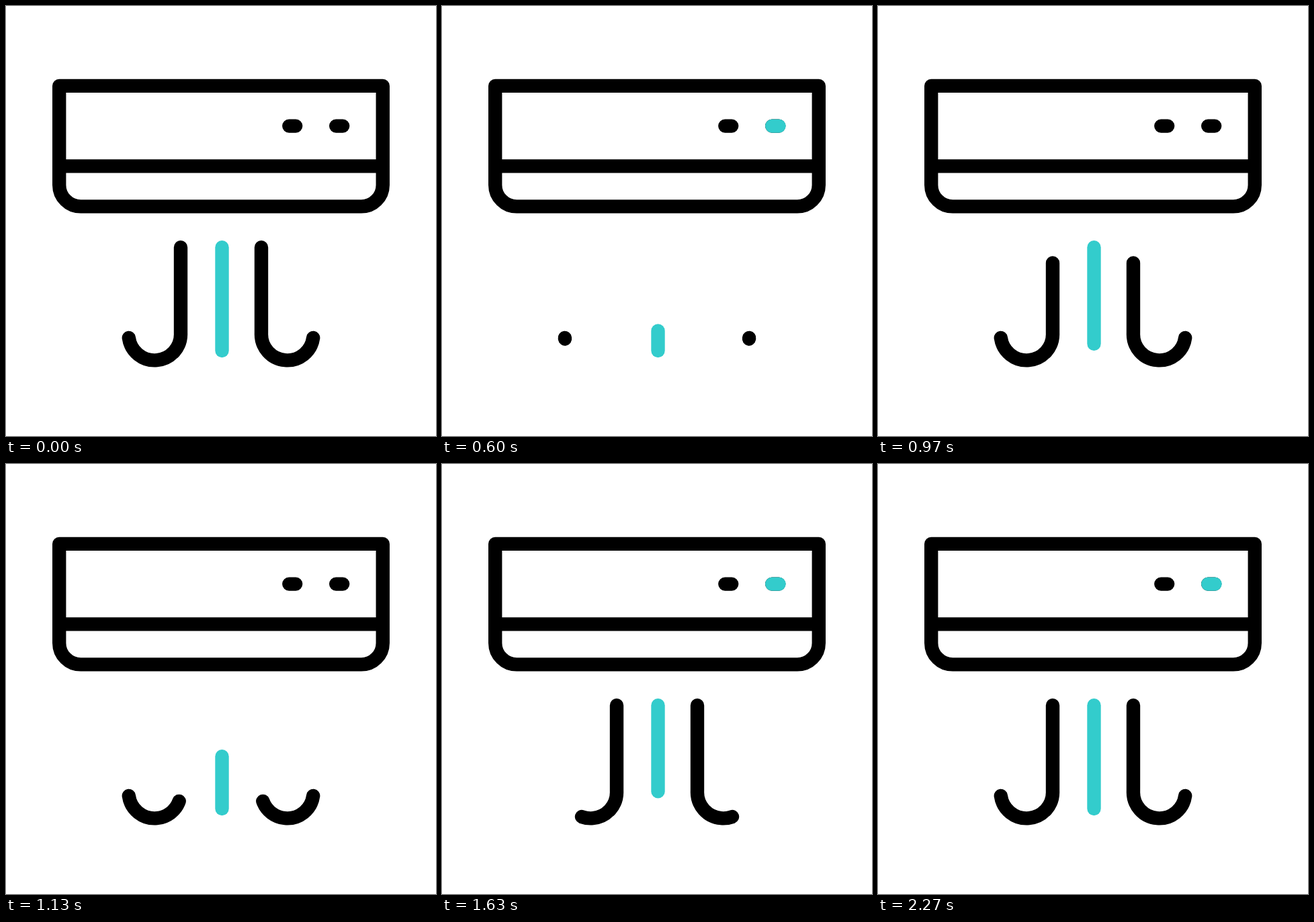
An HTML page without scripts that plays this animation: 640x640 px, repeating every 2.5 s.

```html
<!DOCTYPE html>
<html lang="en">
<head>
<meta charset="utf-8">
<title>Air conditioner</title>
<style>
  html, body { margin: 0; width: 100%; height: 100%; overflow: hidden; background: #fff; }
  svg { display: block; width: 100%; height: 100%; }
  .ink { fill: none; stroke: #000; stroke-width: 20.4; stroke-linecap: round; stroke-linejoin: round; }
  .teal { stroke: #33cccc; }

  /* Each stream drains downwards, then refills from the top, twice per loop. */
  .air { stroke-dasharray: 1.001 2; animation: side 2.5s linear infinite; }
  .mid { animation-name: mid; }
  .led { opacity: 0; animation: blink 2.5s step-end infinite; }

  @keyframes side {
    0% { stroke-dashoffset: 0; }
    10.667% { stroke-dashoffset: 0; animation-timing-function: ease-in; }
    24.13% { stroke-dashoffset: -1.005; }
    24.14% { stroke-dashoffset: 1.005; }
    37.6% { stroke-dashoffset: 0; }
    50.8% { stroke-dashoffset: -1.005; }
    50.81% { stroke-dashoffset: 1.005; animation-timing-function: cubic-bezier(.333, .413, .667, .873); }
    70.667%, 100% { stroke-dashoffset: 0; }
  }
  @keyframes mid {
    0% { stroke-dashoffset: 0; }
    10.667% { stroke-dashoffset: 0; animation-timing-function: cubic-bezier(.33, 0, .9, .9); }
    26.4% { stroke-dashoffset: -1.005; }
    26.41% { stroke-dashoffset: 1.005; }
    39.73% { stroke-dashoffset: 0; }
    50.93% { stroke-dashoffset: -1.005; }
    50.94% { stroke-dashoffset: 1.005; animation-timing-function: cubic-bezier(.333, .349, .667, .911); }
    70.667%, 100% { stroke-dashoffset: 0; }
  }
  @keyframes blink {
    0%, 36.67%, 75.95% { opacity: 0; }
    12%, 50.93%, 90.65%, 100% { opacity: 1; }
  }
</style>
</head>
<body>
<svg viewBox="0 0 640 640">
  <g class="ink">
    <path d="M79.2 118.9H560.8V266.4a32 32 0 0 1-32 32H111.2a32 32 0 0 1-32-32Z"/>
    <path d="M79.2 238.4H560.8"/>
    <path d="M421.3 178.6H431.2M491.2 178.6H501.2"/>
    <path class="teal led" d="M491.2 178.6H501.5"/>
    <path class="air" pathLength="1" d="M260 359.2V487a38.8 38.8 0 0 1-77.2 6.9"/>
    <path class="air" pathLength="1" d="M380 359.2V487a38.8 38.8 0 0 0 77.2 6.9"/>
    <path class="air mid teal" pathLength="1" d="M321.5 359.2V513"/>
  </g>
</svg>
</body>
</html>
```
